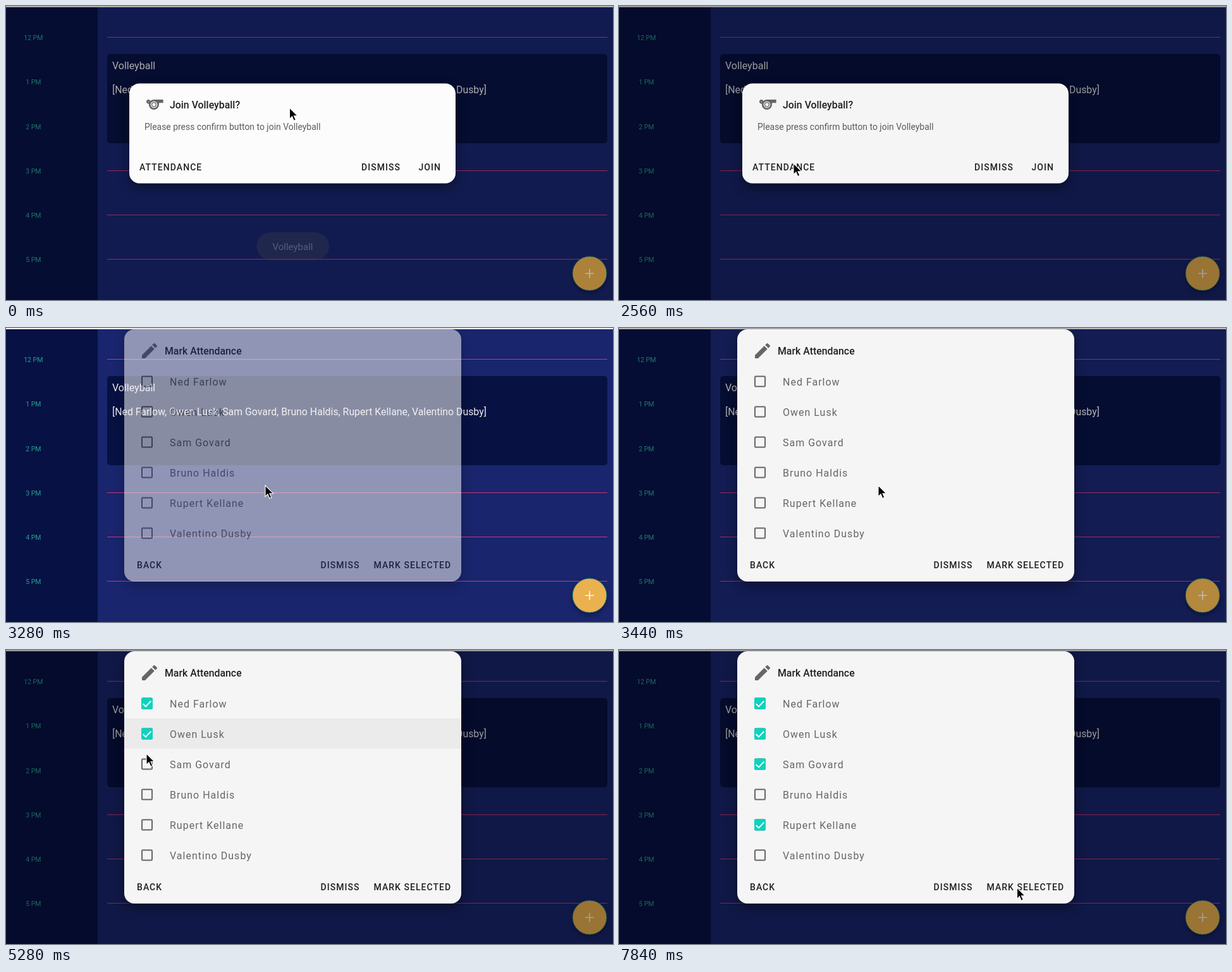
Animation, 960 px wide and 465 px high, one loop 8 s. Source, as an HTML page:

```html
<!DOCTYPE html>
<html lang="en">
<head>
<meta charset="utf-8">
<title>Attendance</title>
<style>
  html, body { margin: 0; width: 100%; height: 100%; overflow: hidden; background: #1a2670; }
  svg { display: block; width: 960px; height: 465px; font-family: Roboto, sans-serif; }
  .hour { font-size: 10.5px; fill: #28a592; text-anchor: middle; }
  .card { font-size: 16px; fill: #f4f4f8; }
  .title { font-size: 15.85px; font-weight: 500; fill: #212121; }
  .body { font-size: 13.95px; fill: #5c5c5c; }
  .btn { font-size: 14px; font-weight: 500; letter-spacing: 1.05px; fill: #212121; }
  .name { font-size: 16px; letter-spacing: 1px; fill: #666; }
  .icon { fill: #666; }
  .dialog { filter: drop-shadow(0 7px 9px rgba(0, 0, 0, .4)); }
  .fab { filter: drop-shadow(0 3px 3px rgba(0, 0, 0, .35)); }
</style>
</head>
<body>
<svg viewBox="0 0 960 465" xmlns="http://www.w3.org/2000/svg">
  <rect width="960" height="465" fill="#1a2670"/>
  <rect width="145" height="465" fill="#071246"/>
  <rect width="960" height="2" fill="#f6f6f6"/>
  <g id="hours"></g>
  <rect x="160" y="76" width="791" height="141" rx="5" fill="#071244"/>
  <text class="card" x="168" y="99.5">Volleyball</text>
  <text class="card" x="168" y="137.5" style="font-size:15.85px" id="people"></text>
  <circle class="fab" cx="923" cy="423" r="27" fill="#f2b752" stroke="#237f72"/>
  <path d="M916 423h14M923 416v14" stroke="#fff" stroke-width="1.6"/>
  <rect id="scrim" width="960" height="465"/>

  <g id="join" class="dialog">
    <rect class="panel" x="195" y="122.5" width="516" height="158" rx="16"/>
    <path class="icon" fill-rule="evenodd" transform="translate(219.3 140) scale(1.333)"
      d="M11.23 6c-1.66 0-3.22.66-4.36 1.73C6.54 6.73 5.61 6 4.5 6a2.5 2.5 0 1 0 .61 4.92c-.05.25-.09.51-.1.78-.18 3.68 2.95 6.68 6.68 6.27 2.55-.28 4.68-2.26 5.19-4.77.15-.71.15-1.4.06-2.06-.09-.6.38-1.13.99-1.13H22V6zM4.5 8a.5.5 0 1 1 0 1 .5.5 0 0 1 0-1zM11 8a4 4 0 1 1 0 8 4 4 0 0 1 0-8zM11 9a3 3 0 1 0 0 6 3 3 0 0 0 0-6zM11 10a2 2 0 1 1 0 4 2 2 0 0 1 0-4z"/>
    <text class="title" x="259" y="162">Join Volleyball?</text>
    <text class="body" x="219" y="195.5">Please press confirm button to join Volleyball</text>
    <text class="btn" x="211" y="260">ATTENDANCE</text>
    <text class="btn" x="562" y="260">DISMISS</text>
    <text class="btn" x="652.5" y="260">JOIN</text>
  </g>

  <g id="mark" class="dialog">
    <rect class="panel" x="187" y="2" width="533" height="399" rx="16"/>
    <path class="icon" transform="translate(211 20) scale(1.333)"
      d="M3 17.25V21h3.75L17.81 9.94l-3.75-3.75zM20.71 7.04a1 1 0 0 0 0-1.41l-2.34-2.34a1 1 0 0 0-1.41 0l-1.83 1.83 3.75 3.75z"/>
    <text class="title" x="251" y="42">Mark Attendance</text>
    <g id="rows"></g>
    <text class="btn" x="207" y="380">BACK</text>
    <text class="btn" x="497.5" y="380">DISMISS</text>
    <text class="btn" x="581.5" y="380">MARK SELECTED</text>
  </g>

  <g id="toast">
    <rect x="396.5" y="358" width="114.5" height="44" rx="22" fill="#424349"/>
    <text x="453.5" y="386" font-size="15" fill="#eee" text-anchor="middle">Volleyball</text>
  </g>
  <path id="cursor" d="M0 0V17.6L4 13.8 6.8 20.4 9.8 19.1 7 12.7H12.6z" stroke="#fff" stroke-width="1.1"/>
</svg>
<script>
const LOOP = 8000;
const $ = id => document.getElementById(id);
const people = ["Ned Farlow", "Owen Lusk", "Sam Govard", "Bruno Haldis", "Rupert Kellane", "Valentino Dusby"];
const absent = ["Bruno Haldis", "Valentino Dusby"];

const rowY = i => 84.5 + 48 * i;
const hitTime = i => 4640 + 390 * i;
const clamp = v => Math.min(1, Math.max(0, v));
const ramp = (t, start, length) => clamp((t - start) / length);
const smooth = u => u * u * (3 - 2 * u);

// Pointer moves: start, length, x, y
const moves = [
  [1280, 240, 457.5, 252],
  [1600, 700, 276, 249],
  [3020, 260, 410, 249],
  [3560, 560, 221, 92],
  [4240, 160, 226, 127],
  [4440, 160, 222, rowY(0) + 3],
  ...[1, 2, 3, 4].map(i => [hitTime(i) - 240, 180, 222, rowY(i) + 3]),
  [6480, 960, 629.5, 376]
];

function pointer(t) {
  let x = 448.5, y = 161;
  for (const [start, length, toX, toY] of moves) {
    const u = smooth(ramp(t, start, length));
    x += (toX - x) * u;
    y += (toY - y) * u;
  }
  return `translate(${x} ${y})`;
}

$("people").textContent = `[${people.join(", ")}]`;

$("hours").innerHTML = [12, 1, 2, 3, 4, 5].map((hour, i) => {
  const y = 49.5 + 70.2 * i;
  return `<rect x="160" y="${Math.floor(y)}" width="791" height="1" fill="#d03c7c"/>
    <text class="hour" x="43.3" y="${y + 4.6}">${hour} PM</text>`;
}).join("");

$("rows").innerHTML = people.map((name, i) => {
  const y = rowY(i);
  return `<clipPath id="clip${i}"><rect x="187" y="${y - 24.5}" width="533" height="48"/></clipPath>
    <circle class="ripple" cx="222" cy="${y}" clip-path="url(#clip${i})"/>
    <rect x="215" y="${y - 8}" width="16" height="16" rx="1.2" fill="none" stroke="#666" stroke-width="2"/>
    <g class="tick">
      <rect x="214" y="${y - 9}" width="18" height="18" rx="2" fill="#0bd3bf"/>
      <path d="M-6.3 .7L-2 4.9 6.3-3.9" fill="none" stroke="#fff" stroke-width="2"/>
    </g>
    <text class="name" x="259" y="${y + 6}">${name}</text>`;
}).join("");

const ripples = document.querySelectorAll(".ripple");
const ticks = document.querySelectorAll(".tick");
const panels = document.querySelectorAll(".panel");

function drawRow(i, t) {
  const age = t - hitTime(i);
  const on = age >= 0 && !absent.includes(people[i]);
  ripples[i].setAttribute("r", on ? Math.min(520, 60 + age * 2.2) : 0);
  ripples[i].setAttribute("opacity", .04 * (1 - ramp(age, 240, 220)));
  ticks[i].setAttribute("opacity", on ? ramp(age, -40, 100) : 0);
  ticks[i].lastElementChild.setAttribute("transform",
    `translate(223 ${rowY(i)}) scale(${ramp(age, -75, 250)})`);
}

function draw(t) {
  const fade = (id, value) => $(id).setAttribute("opacity", value);
  fade("scrim", .37 * (1 - ramp(t, 2880, 280) + ramp(t, 3260, 260)) - .08 * (1 - ramp(t, 0, 160)));
  fade("join", 1 - ramp(t, 2900, 140));
  fade("mark", ramp(t, 3200, 150));
  fade("toast", ramp(t, -100, 340) * (1 - ramp(t, 2160, 320)));
  const tone = Math.round(252 - 7 * ramp(t, 0, 480));
  panels.forEach(p => p.setAttribute("fill", `rgb(${tone},${tone},${tone})`));
  people.forEach((_, i) => drawRow(i, t));
  $("cursor").setAttribute("transform", pointer(t));
}

const start = performance.now();
function frame() {
  draw((performance.now() - start) % LOOP);
  requestAnimationFrame(frame);
}
frame();
</script>
</body>
</html>
```
